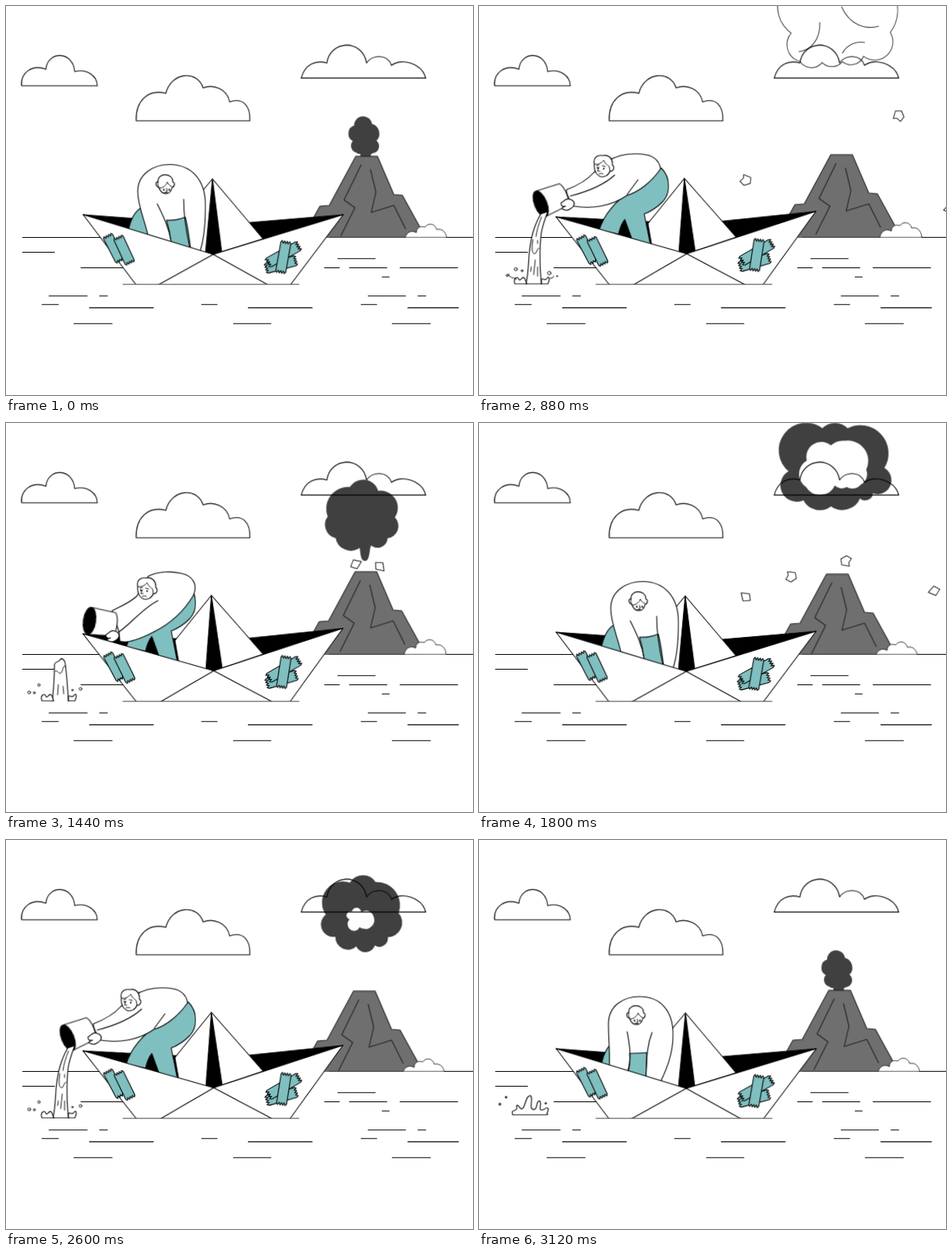
Recreate the animation shown at these times as an HTML page without scripts. Size 600x500 px, loop 3.16 s.

```html
<!DOCTYPE html>
<html lang="en">
<head>
<meta charset="utf-8">
<title>Paper boat</title>
<style>
html,body{margin:0;width:100%;height:100%;overflow:hidden;background:#fff}
svg{display:block;width:600px;height:500px}
.ink{fill:#fff;stroke:#000;stroke-width:1.1;stroke-linejoin:round;stroke-linecap:round}
.line{fill:none}
.teal{fill:#80bfc0}
.black{fill:#000}
.thin{stroke-width:.9}
.shake{animation:shake 3160ms linear infinite}
.smoke,.hole,.tail,.curl{animation:1053.333ms linear infinite}
.smoke{fill:#404040;stroke:#404040;stroke-width:2;animation-name:smoke}
.hole{fill:#fff;animation-name:hole}
.tail{fill:#404040;animation-name:tail}
.curl{fill:none;stroke:#404040;stroke-width:1.1;animation-name:curl}
.rock{stroke:#333;stroke-width:1.1;offset-rotate:auto;animation:fly 3160ms linear infinite}
.west{offset-path:path('M458 195Q390 80 305 310')}
.east{offset-path:path('M474 193Q545 72 622 310')}
.tilt,.bent,.pour,.bent path,.pour path,.bent .head,.pour .head,.bucket,.water>*{animation:1580ms linear infinite}
.tilt{transform-origin:266px 319px;animation-name:tilt}
.bent{animation-name:bent}
.pour{animation-name:pour}
.bent .back{animation-name:bentBack}
.bent .arms{animation-name:bentArms}
.bent .shorts{animation-name:shorts}
.bent .head{animation-name:nod}
.pour .back{animation-name:pourBack}
.pour .arms{animation-name:pourArms}
.pour .head{animation-name:turn}
.pour .bucket{animation-name:bucket}
.pour .hand{animation-name:hand}
.water .stream{animation-name:stream}
.water .drip{animation-name:drip}
.water .foam{animation-name:foam}
.water .near{animation-name:near}
.water .far{animation-name:far;transform-origin:68px 352px}
.water .crown{animation-name:crown;transform-origin:66px 353px}

@keyframes shake{
0%,2.5%,98.6%,100%{transform:none}
6%{transform:translate(2px,-2px)}
11.4%{transform:translate(1.5px,1px)}
19%{transform:translate(-2px,1px)}
27.85%{transform:translate(2.5px,-2px)}
36%{transform:translate(1px,2px)}
45.57%{transform:translate(-1px,-2px)}
51%{transform:translate(2px,1px)}
56.96%{transform:translate(-3px,1px)}
65%{transform:translate(1px,-2px)}
74%{transform:translate(2px,1px)}
82.28%{transform:translate(-3px,1px)}
90%{transform:translate(1px,-2px)}
}
@keyframes smoke{
0%,6%,94.1%,100%{d:path('M447 173A10 10 0 0 1 448 154A10 10 0 0 1 469 152A12 12 0 0 1 474 173A8 8 0 0 1 470 188A3 3 0 0 1 466 189A6 6 0 0 1 456 188A4 4 0 0 1 450 187A8 8 0 0 1 447 173Z')}
32%,38%{d:path('M415 122A27 27 0 0 1 443 85A19 19 0 0 1 478 90A21 21 0 0 1 499 123A15 15 0 0 1 490 149A12 12 0 0 1 469 157A8 8 0 0 1 455 161A19 19 0 0 1 425 149A17 17 0 0 1 415 122Z')}
46.8%{d:path('M415 95A26 26 0 0 1 445 55A18.500 18.500 0 0 1 477 54A29 29 0 0 1 506 93A18 18 0 0 1 492 123A10 10 0 0 1 476 133A12 12 0 0 1 453 134A15 15 0 0 1 427 122A15 15 0 0 1 415 95Z')}
70.9%{d:path('M402 61A34 34 0 0 1 444 7A22 22 0 0 1 476 7A35 35 0 0 1 522 57A17 17 0 0 1 508 88A9 9 0 0 1 492 94A24 24 0 0 1 455 105A23 23 0 0 1 420 97A20 20 0 0 1 402 61Z')}
83.5%{d:path('M399 38A42 42 0 0 1 428 -38A28 28 0 0 1 481 -38A47 47 0 0 1 525 37A23 23 0 0 1 491 67A17 17 0 0 1 464 74A17 17 0 0 1 438 75A17 17 0 0 1 410 74A22 22 0 0 1 399 38Z')}
94%{d:path('M399 -72A42 42 0 0 1 428 -148A28 28 0 0 1 481 -148A47 47 0 0 1 525 -73A23 23 0 0 1 491 -43A17 17 0 0 1 464 -36A17 17 0 0 1 438 -35A17 17 0 0 1 410 -36A22 22 0 0 1 399 -72Z')}
}
@keyframes hole{
0%,40%,94.1%,100%{opacity:0;d:path('M457 105A1 1 0 0 1 457 105A1 1 0 0 1 457 105A1 1 0 0 1 457 105A1 1 0 0 1 457 105A1 1 0 0 1 457 105A1 1 0 0 1 457 105A1 1 0 0 1 457 105A1 1 0 0 1 457 105Z')}
40.1%{opacity:1}
46.8%{d:path('M444 101A5 5 0 0 1 447 91A6 6 0 0 1 459 92A10 10 0 0 1 475 98A11 11 0 0 1 471 111A8 8 0 0 1 463 113A8 8 0 0 1 457 111A8 8 0 0 1 445 114A9 9 0 0 1 444 101Z')}
70.9%{d:path('M424 47A19 19 0 0 1 455 28A22 22 0 0 1 473 22A26 26 0 0 1 500 59A15 15 0 0 1 493 78A14 14 0 0 1 475 81A12 12 0 0 1 460 79A21 21 0 0 1 423 81A20 20 0 0 1 424 47Z')}
83.5%{d:path('M399 38A42 42 0 0 1 428 -38A28 28 0 0 1 481 -38A47 47 0 0 1 525 37A23 23 0 0 1 491 67A17 17 0 0 1 464 74A17 17 0 0 1 438 75A17 17 0 0 1 410 74A22 22 0 0 1 399 38Z')}
94%{opacity:1;d:path('M399 -72A42 42 0 0 1 428 -148A28 28 0 0 1 481 -148A47 47 0 0 1 525 -73A23 23 0 0 1 491 -43A17 17 0 0 1 464 -36A17 17 0 0 1 438 -35A17 17 0 0 1 410 -36A22 22 0 0 1 399 -72Z')}
}
@keyframes tail{
0%,6%,94.1%,100%{opacity:1;d:path('M454 176C455 185 454 205 462 205C470 205 468 185 470 176Z')}
32%,38%{opacity:1;d:path('M453 152C457 162 454 179 462 179C469 179 467 162 471 152Z')}
44%,94%{opacity:1;d:path('M454 125C456 128 456 130 460 130C464 130 466 128 468 125Z')}
44.1%,93.9%{opacity:0}
}
@keyframes curl{
0%,78%,94%,100%{opacity:0}
78.1%{opacity:1;transform:translate(-2px,12px)}
83.5%{opacity:1;transform:translate(-2px,2px)}
93.9%{opacity:1;transform:translate(-2px,-107px)}
}
@keyframes fly{
0%{offset-distance:0%;opacity:1}
20%{offset-distance:100%;opacity:1}
20.01%,100%{offset-distance:100%;opacity:0}
}
@keyframes tilt{
0%,22.8%,36%,97%,100%{transform:none}
14%{transform:rotate(-.2deg)}
49%,91.5%{transform:translate(.6px,-.8px) rotate(-1.2deg)}
}
@keyframes bent{
0%,36%,95.6%,100%{opacity:1}
36.01%,95.59%{opacity:0}
}
@keyframes pour{
0%,36%,95.6%,100%{opacity:0}
36.01%,95.59%{opacity:1}
}
@keyframes bentBack{
0%,14.5%,100%{d:path('M182 294C178 275 169 257 169 238C169 215 190 203 211 203.5C237 204 256 222 256 256C256 282 254 300 249 315Z')}
22.8%{d:path('M183 295C178 275 168 257 168 238C168 216 190 203.5 209 203.5C235 204 254 222 254 256C254 280 248 300 245 313Z')}
36%,97.5%{d:path('M167 290C168 275 166 255 166 236C166 212 186 201 206 201C232 201 249 218 249 250C249 275 240 295 233 310Z')}
}
@keyframes bentArms{
0%,14.5%,100%{d:path('M194 254C203 272 209 285 212 303M228 248C228 262 230 285 236 311')}
22.8%{d:path('M194 252C200 265 204 280 205 301M227 249C224 262 226 280 229 309')}
36%,97.5%{d:path('M190 246C193 262 196 280 191 298M222 247C216 262 215 275 214 305')}
}
@keyframes shorts{
0%,14.5%,100%{d:path('M206 275Q218 276 230 271C234 285 235 300 237 312L212 304C211 295 209 285 206 275Z')}
22.8%{d:path('M202 273Q214 275 226 272C227 285 228 300 229 310L205 303C205 295 204 285 202 273Z')}
36%,97.5%{d:path('M193 274Q204 274 215 273C215 285 214 295 214 306L190 298C193 290 194 284 193 274Z')}
}
@keyframes nod{
0%,22.8%,100%{transform:none}
36%,97.5%{transform:translate(-3px,-4px)}
}
@keyframes pourBack{
0%,38%,90%,100%{d:path('M182 197C195 190 212 190 225 193C240 196 247 208 240 222C228 242 210 258 190 268C175 276 155 284 146 280L145 269C142 258 138 248 136 241C148 235 160 230 168 222Z')}
47%,77%{d:path('M165 199C178 191 195 189 208 190C222 191 231 196 233 209C222 225 205 239 190 243C170 257 145 261 121 257L116 248C113 243 112 240 112 236C125 231 138 224 147 214Z')}
}
@keyframes pourArms{
0%,38%,90%,100%{d:path('M145 268C160 258 175 238 195 228M190 268L190 268')}
47%,77%{d:path('M117 244C140 238 160 230 174 217M190 242L204 223')}
}
@keyframes turn{
0%,38%,90%,100%{transform:translate(21px,7px)}
47%,77%{transform:none}
}
@keyframes bucket{
0%,38%,90%,100%{transform:translate(107px,254px) rotate(8deg)}
47%,77%{transform:translate(79px,254px) rotate(-22deg)}
}
@keyframes hand{
0%,38%,90%,100%{transform:translate(23px,19px)}
47%,77%{transform:none}
}
@keyframes stream{
0%,43.9%,81.1%,100%{opacity:0}
44%,80%{opacity:1}
44%{clip-path:inset(0 0 90px 0)}
49%,75%{clip-path:inset(0 0 0 0)}
81%{opacity:1;clip-path:inset(28px 0 0 0)}
}
@keyframes drip{
0%,80.9%,96.1%,100%{opacity:0}
81%{opacity:1;transform:translateY(-16px)}
91.1%{transform:none}
96%{opacity:1;transform:translateY(50px)}
}
@keyframes foam{
0%,48.9%,95.1%,100%{opacity:0}
49%,95%{opacity:1}
}
@keyframes near{
0%,48.9%,60.1%,100%{opacity:0}
49%{opacity:1;transform:translateY(8px)}
55.7%,60%{opacity:1;transform:none}
}
@keyframes far{
0%,60%,95.1%,100%{opacity:0}
60.1%{opacity:1;transform:scale(.85)}
64.5%,91.2%,95%{opacity:1;transform:none}
78%{transform:scale(.94)}
}
@keyframes crown{
0%,95%,100%{opacity:0}
95.1%{opacity:1;transform:scaleY(.7)}
97.5%{opacity:1;transform:none}
99.9%{opacity:1;transform:scaleY(.4)}
}
</style>
</head>
<body>
<svg viewBox="-.3 -.3 600 500">
<defs>
<clipPath id="sky"><path d="M-1-1H601V297.3H-1z"/></clipPath>
<clipPath id="above"><path d="M-1-1H601V357.7H-1z"/></clipPath>
<path id="strip" d="M-6.5-17l1.6-2 1.6 3 1.6-3 1.7 3 1.6-3 1.6 3 1.6-3 1.7 2V17l-1.7 2-1.6-3-1.6 3-1.6-3-1.7 3-1.6-3-1.6 3-1.6-2z"/>
<path id="gem" d="M-6-2L1-7 6 1-2 8z"/>
<path id="chunk" d="M-6-4L1-7 7-1 5 6-1 4-5 6z"/>
</defs>

<path class="ink line" d="M21 297.2H600M21 316.2H62M96 336.2H156M426 324.500H474M409 336.2h19M441 336.2h48M506 336.2h74M483 348h9M55 372.400h49M120 372.400h10M465 372.400h48M529 372.400h10M46 383.400h21M251 383.400h20M456 383.400h20M107 387.600h82M311 387.600h82M516 387.600h65M87 408h49M292 408h48M496 408h49"/>

<g clip-path="url(#sky)">
<g class="shake">
<path class="smoke"/><path class="tail"/><path class="hole"/>
<path class="curl" d="M437 22C438 45 425 58 410 60M465 2C475 25 495 32 513 27M466 62C472 50 485 46 495 48"/>
</g>
<g class="ink">
<use href="#gem" class="rock east" style="animation-delay:-3050ms"/>
<use href="#gem" class="rock east" style="animation-delay:-2785ms"/>
<use href="#chunk" class="rock west" style="animation-delay:-2680ms"/>
<use href="#chunk" class="rock" style="offset-path:path('M470 195Q554 40 615 310');animation-delay:-2490ms"/>
<use href="#gem" class="rock west" style="animation-delay:-1760ms"/>
<use href="#gem" class="rock east" style="animation-delay:-1745ms"/>
<use href="#chunk" class="rock" style="offset-path:path('M458 195Q414 40 384 310');animation-delay:-1700ms"/>
<use href="#chunk" class="rock" style="offset-path:path('M467 195Q495 60 525 310');animation-delay:-1410ms"/>
</g>
<g class="shake ink">
<path style="fill:#6f6f6f;stroke:#222" d="M449 193H477L498 242 509 243 531 283 540 302H378L403 257 415 256z"/>
<path class="line" style="stroke:#222" d="M456 204L434 249 448 259 430 295M468 210L475 239 469 265 498 256 513 286"/>
<path class="thin" style="stroke:#222" d="M512 302C512 291 520 287 527 291C527 284 533 282 538 284C542 278 551 279 553 287C561 285 567 292 566 302z"/>
</g>
</g>
<path class="ink line" style="stroke:#333" d="M415 297.2H600"/>

<g class="ink">
<path class="line" d="M20 102.2C18 86 33 74 51 81C53 57 86 57 88 84C104 80 117 90 117 102.2z"/>
<path class="line" d="M167 147.2C166 122 182 106 205 112C212 84 246 82 253 105C266 100 284 106 287 123C304 117 314 128 313 147.2z"/>
<path class="line" d="M379 92.4C384 74 398 69 412 73C416 43 458 42 463 73C470 62 490 61 495 76C508 66 534 73 539 92.4z"/>
</g>

<g clip-path="url(#above)">
<g class="tilt ink">
<path class="black" d="M99 268L222 277 266 319zM313 278L433 268 328 301z"/>
<path d="M265 222L217 279 222 312 266 319 330 299z"/>
<path class="black" d="M265 222L256 317 266 320 277 317z"/>
</g>

<g class="bent ink">
<path class="teal" d="M157 288C160 272 167 262 174 259L184 288 180 296z"/>
<path class="back"/>
<path class="teal shorts"/>
<path class="line arms"/>
<g class="head">
<path d="M195 226C191 225 192 232 196 233C198 238 201 241 205 241C209 241 212 238 213 233C217 232 217 226 214 226C215 214 194 213 195 226z"/>
<path class="line thin" d="M195 226C194 230 196 232 197 234C203 233 206 229 207 226C208 229 211 231 213 232M206 234L207 238H205M203 239.5h4"/>
<path class="line" style="stroke-width:1.8" d="M202.500 235.500v.8M209.500 235.500v.8"/>
</g>
</g>

<g class="pour ink">
<path class="teal" d="M234 208C246 220 246 240 236 251C228 259 220 264 212 267L220 307H199L187 274C184 278 181 283 179 293L154 288C160 268 176 250 196 236z"/>
<path class="back"/>
<g class="bucket">
<path d="M0-17.500L32-15C37-8 37 8 32 15L0 17.500z"/>
<ellipse class="black" rx="8" ry="17.500"/>
</g>
<path class="line arms"/>
<path class="hand" d="M105 253C109 251 111 246 116 248C121 249 124 253 121 257C118 261 112 264 108 261C104 261 107 258 111 257C106 258 105 256 105 253z"/>
<g class="head">
<path d="M148 203C146 194 152 191 159 192C166 190 172 196 171 204C175 207 172 213 168 212C166 218 160 220 156 219C150 217 147 210 148 203z"/>
<path class="line thin" d="M148 203C152 204 157 202 160 198C162 203 165 204 167 206L168 212M154 207L152 212H155M154 215.500Q157 214 159 215.500M151 205l3-1M158 205l4 1"/>
<path class="line" style="stroke-width:1.8" d="M152 207.500v.6M160 208.500v.6"/>
</g>
</g>

<g class="tilt ink">
<path d="M99 268L266 319 433 268 360 365H172z"/>
<path class="line" d="M186.600 363L266 319 345 363"/>
<g class="teal">
<use href="#strip" transform="translate(138.500 311) rotate(-27)"/>
<use href="#strip" transform="translate(151.500 313.500) rotate(-25)"/>
<use href="#strip" transform="translate(353 332) rotate(75) scale(1 1.1)"/>
<use href="#strip" transform="translate(356 319) rotate(61) scale(1 1.25)"/>
<use href="#strip" transform="translate(356 322.500) rotate(10) scale(1 1.1)"/>
</g>
</g>
</g>
<path class="ink line" style="stroke:#444" d="M150 357.500H376"/>

<g class="water ink" clip-path="url(#above)">
<g class="stream">
<path d="M79 267C69 285 66 300 64 320C63 335 63 345 60 357H80C78 340 77 310 80 290C82 280 85 272 88 264z"/>
<path class="line thin" d="M80 271C76 281 74 288 73 296M69 300C67 312 68 318 71 318C74 319 74 310 77 311M72 326L70 345M75 335V347M67 335L66 341M75 301V305"/>
</g>
<g class="drip">
<path d="M59 358C61 340 62 325 62 309C63 304 66 308 69 303C72 300 76 304 76 309C78 325 79 340 80 358z"/>
<path class="line thin" d="M63 318C66 315 67 322 70 320C73 319 72 310 76 311M67 335L66 348M73 337L74 347"/>
</g>
<g class="foam">
<path d="M61 357H46C43 350 49 346 51 351C53 355 56 344 59 351zM80 357H88C92 350 89 346 87 350C84 354 81 348 80 352z"/>
</g>
<g class="near thin">
<circle cx="47" cy="338" r="2"/><circle cx="55" cy="340" r="1.2"/><circle cx="90" cy="343" r="2.200"/><circle cx="36" cy="346" r="1.300"/><circle cx="100" cy="347" r=".7"/>
<path class="line" d="M38 344C38 350 44 348 48 351M91 350Q95 350 96 347"/>
</g>
<g class="far thin">
<circle cx="29.500" cy="346" r="1.800"/><circle cx="36" cy="346.500" r="1.300"/><circle cx="42" cy="336.500" r="1.600"/><circle cx="85" cy="343" r="1"/><circle cx="95.500" cy="341.500" r="1.800"/>
</g>
<g class="crown">
<path d="M43 353C40 343 50 352 48 341C51 338 53 350 57 343C60 337 61 327 66 328C70 332 63 346 70 346C76 346 72 334 78 335C81 341 74 349 83 346C89 341 90 346 87 351C89 352 88 353 85 353z"/>
<circle cx="26.500" cy="339" r="1.200"/><circle cx="34.500" cy="330" r="1"/><circle cx="85.500" cy="338" r=".8"/>
</g>
</g>
</svg>
</body>
</html>
```
